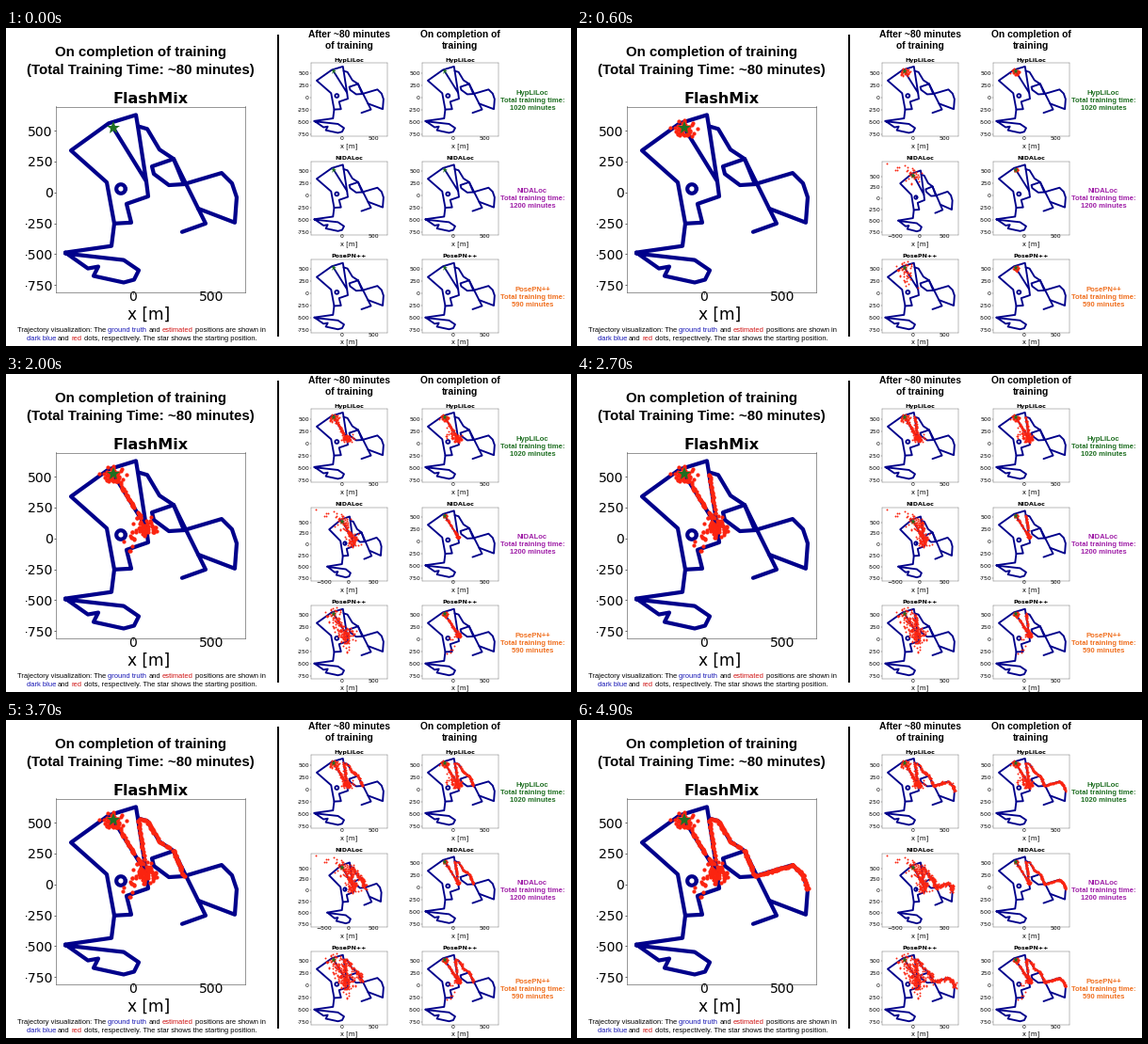
A matplotlib script for the animation above (5000 ms loop, 600 px wide and 338 px high).

```python
import numpy as np
import matplotlib.pyplot as plt
from matplotlib.animation import FuncAnimation
from matplotlib.offsetbox import AnnotationBbox, HPacker, TextArea
from matplotlib.patches import Rectangle

W, H, DPI = 600, 338, 100
FRAMES, INTERVAL = 50, 100
PT = 72 / DPI  # points per pixel
BLUE, RED, GREEN = "#00008b", "#fb2410", "#1f6f22"
SANS, PLOT = "Liberation Sans", "DejaVu Sans"
XLIM, YLIM = (-494, 717), (-805, 695)
WIDE_XLIM, WIDE_YTOP = (-775, 775), 830

# Landmarks of the drive, in stage pixels on the large map.
START, FORK, BEND, TOP = (114, 106), (149, 163), (140, 104), (138, 92)
BRIDGE, CORNER, CREST, EAST = (178, 139), (189, 166), (229, 154), (245, 180)
TOWN = (115, 208)
NORTH_EAST = [BEND, (150, 107), (163, 129), BRIDGE, CORNER, CREST, (240, 165),
              EAST]
ANGLE = np.linspace(0, 2 * np.pi, 24)
ROADS = [
    [START, FORK, BEND, TOP, (109, 101), (69, 130), (107, 164), TOWN,
     (112, 232), (63, 239)],
    [FORK, (151, 179), (128, 187), (133, 207), TOWN],
    [(63, 239), (87, 256), (98, 254), (93, 264), (125, 271), (136, 268),
     (141, 258), (125, 247), (63, 240)],
    NORTH_EAST + [(243, 207), (204, 192)],
    [BRIDGE, (155, 147), (157, 155), (173, 167), CORNER],
    [BRIDGE, (212, 208), (187, 217)],
    np.column_stack([122 + 4.8 * np.cos(ANGLE), 171 + 4.8 * np.sin(ANGLE)]),
]

# Parts of the drive: start and end in seconds, and the way.
LEGS = [(0, .55, [START, START]), (.55, 1.35, [START, FORK]),
        (1.35, 2.1, [FORK, FORK]), (2.1, 2.7, [FORK, BEND]),
        (2.7, 4.9, NORTH_EAST)]

# Per map: method, column, row, error in metres on the road and at stops,
# and strays as (start, end, share, dx, dy).
MAPS = [
    ("FlashMix", None, 0, 3, 28, (1.4, 2.1, .3, -130, -150)),
    ("HypLiLoc", 0, 0, 10, 25, (0, 0, 0, 0, 0)),
    ("HypLiLoc", 1, 0, 8, 25, (.7, 1.4, .4, -100, -150)),
    ("NIDALoc", 0, 1, 25, 45, (0, .5, .25, -560, 280)),
    ("NIDALoc", 1, 1, 6, 6, (0, 0, 0, 0, 0)),
    ("PosePN++", 0, 2, 18, 55, (0, 1.2, .5, 40, -400)),
    ("PosePN++", 1, 2, 8, 14, (1, 1.5, .2, -170, -400)),
]


def to_metres(points):
    x, y = np.asarray(points, float).T
    return (x - 135) / .166, (174.8 - y) / .132


def along(way, share):
    """Points at the given shares of the way's length."""
    way = np.asarray(way, float)
    steps = np.hypot(*np.diff(way, axis=0).T)
    at = np.concatenate([[0], np.cumsum(steps)])
    return np.column_stack([np.interp(share * at[-1], at, c) for c in way.T])


def position(t):
    spots = np.empty((t.size, 2))
    for start, end, way in LEGS:
        on_leg = (t >= start) & (t <= end)
        share = (t[on_leg] - start) / (end - start)
        spots[on_leg] = along(way, share ** .8)
    return spots


def estimates(seed, road_error, stop_error, stray):
    rng = np.random.default_rng(seed)
    t = np.sort(rng.uniform(0, 4.9, 420))
    spots = position(t)
    to_stop = np.min([np.hypot(*(spots - stop).T) for stop in (START, FORK)],
                     axis=0)
    sigma = road_error + stop_error * np.exp(-(to_stop / 11) ** 2)
    start, end, share, dx, dy = stray
    hit = (t >= start) & (t < end) & (rng.random(t.size) < share)
    pull = hit * rng.random(t.size)
    x, y = to_metres(spots)
    x += sigma * rng.normal(size=t.size) + dx * pull
    y += sigma * rng.normal(size=t.size) + dy * pull
    return t, x, y


fig = plt.figure(figsize=(W / DPI, H / DPI), dpi=DPI, facecolor="white")
stage = fig.add_axes([0, 0, 1, 1], zorder=5)
stage.set(xlim=(0, W), ylim=(H, 0))
stage.axis("off")


def write(x, baseline, text, px, color="black", weight="bold", family=SANS):
    stage.text(x, baseline, text, size=px * PT, color=color, weight=weight,
               family=family, ha="center", va="baseline")


def write_parts(x, bottom, parts, px):
    areas = [TextArea(s, textprops=dict(color=c, size=px * PT, family=SANS))
             for s, c in parts]
    line = HPacker(children=areas, align="baseline", pad=0,
                   sep=.278 * px * PT)
    stage.add_artist(AnnotationBbox(line, (x, bottom), frameon=False, pad=0,
                                    box_alignment=(.5, 0)))


def add_map(name, column, row):
    big = column is None
    if big:
        left, top, width, height = 53, 83.5, 201, 197
        tick, title, label, road, tick_len = 14, 16, 17, 4.2, 2
        title_y, label_y = 80.5, 310
    else:
        left, top = 323.5 + 118 * column, 37.4 + 104.4 * row
        width, height = 81, 78
        tick, title, label, road, tick_len = 6.1, 6.3, 6.8, 1.9, 1
        title_y, label_y = top - 1.8, top + 89.5
    ax = fig.add_axes([left / W, 1 - (top + height) / H, width / W, height / H])
    ax.set(xticks=[-500, 0, 500], yticks=range(-750, 501, 250))
    ax.set(xlim=XLIM, ylim=YLIM)
    edge = .6 if big else .4
    ax.tick_params(labelsize=tick * PT, labelfontfamily=PLOT,
                   length=tick_len * PT, width=edge * PT, pad=tick_len * .7 * PT)
    ax.tick_params(axis="x", pad=-tick * .25 * PT)
    for spine in ax.spines.values():
        spine.set(linewidth=edge * PT, color="#555555")

    for points in ROADS:
        ax.plot(*to_metres(points), color=BLUE, lw=road * PT,
                solid_capstyle="round", solid_joinstyle="round")
    dots, = ax.plot([], [], "o", color=RED, ms=road * PT, mew=0, zorder=4)
    ax.plot(*to_metres([START]), "*", color=GREEN, mew=0, zorder=5,
            ms=road * 3.3 * PT)

    middle = left + width / 2
    write(middle, title_y, name, title, family=PLOT)
    write(middle - 2 * big, label_y, "x [m]", label, weight="normal",
          family=PLOT)
    # The maps are cropped at the left, cutting into the minus signs.
    crop = 20.5 if big else left - 14
    stage.add_patch(Rectangle((crop - 14, top), 14, height + 4, color="white",
                              lw=0))
    return ax, dots


panels = []
for seed, (name, column, row, *errors) in enumerate(MAPS):
    panels.append((*add_map(name, column, row), estimates(seed, *errors)))
wide_map = panels[3][0]

write(143, 30.3, "On completion of training", 15)
write(143, 49, "(Total Training Time: ~80 minutes)", 15)
for x, lines in [(364.5, ("After ~80 minutes", "of training")),
                 (482, ("On completion of", "training"))]:
    for i, text in enumerate(lines):
        write(x, 10 + 11.8 * i, text, 10.3)

for row, (name, minutes, color) in enumerate([
        ("HypLiLoc", 1020, GREEN), ("NIDALoc", 1200, "#a020a8"),
        ("PosePN++", 590, "#f07020")]):
    for i, text in enumerate((name, "Total training time:",
                              f"{minutes} minutes")):
        write(559, 71.2 + 104.2 * row + 8 * i, text, 7.7, color)

stage.add_patch(Rectangle((287.5, 7), 2, 321, color="black", lw=0))
INK, NAVY, CRIMSON = "black", "#1414b4", "#d01414"
write_parts(144, 325, [
    ("Trajectory visualization: The", INK), ("ground truth", NAVY),
    ("and", INK), ("estimated", CRIMSON),
    ("positions are shown in", INK)], 7.5)
write_parts(144, 334.5, [
    ("dark blue", NAVY), ("and", INK), ("red", CRIMSON),
    ("dots, respectively. The star shows the starting position.", INK)], 7.5)


def update(frame):
    now = frame * INTERVAL / 1000
    for _, dots, (t, x, y) in panels:
        seen = t <= now
        dots.set_data(x[seen], y[seen])
    # Early outliers force this map to zoom out.
    zoom = min(now / .5, 1)
    wide_map.set_xlim(*(a + (b - a) * zoom for a, b in zip(XLIM, WIDE_XLIM)))
    wide_map.set_ylim(YLIM[0], YLIM[1] + (WIDE_YTOP - YLIM[1]) * zoom)
    return [dots for _, dots, _ in panels]


animation = FuncAnimation(fig, update, frames=FRAMES, interval=INTERVAL,
                          repeat=True, repeat_delay=0, blit=False)
plt.show()
```
